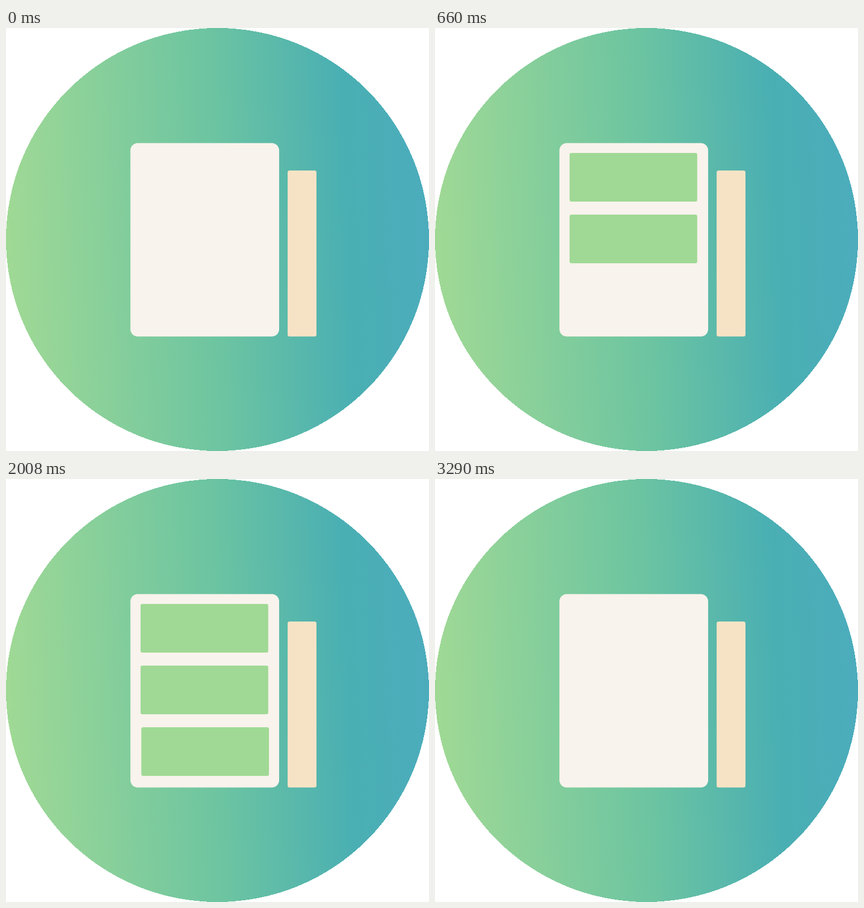
These frames come from a looping animation (748x748 px, 3.32 s). An HTML page:

```html
<!DOCTYPE html>
<html lang="en">
<head>
<meta charset="utf-8">
<title>Filling shelf</title>
<style>
  html, body { margin: 0; width: 100%; height: 100%; overflow: hidden; background: #fff; }
  svg { display: block; width: 100vw; height: 100vh; }
  .row { fill: #a0d995; opacity: 0; }
</style>
</head>
<body>
<svg viewBox="0 0 748 748">
  <defs>
    <linearGradient id="sky" gradientUnits="userSpaceOnUse" x1="0" y1="390" x2="748" y2="358">
      <stop offset="0" stop-color="#a0d995"/>
      <stop offset=".5" stop-color="#6cc4a1"/>
      <stop offset=".81" stop-color="#4aafb3"/>
      <stop offset="1" stop-color="#4cacbc"/>
    </linearGradient>
  </defs>
  <circle cx="374" cy="374" r="374" fill="url(#sky)" shape-rendering="crispEdges"/>
  <rect x="220" y="203.5" width="263" height="342" rx="13" fill="#f8f3ec"/>
  <rect x="498" y="252" width="51" height="293.5" rx="3.5" fill="#f6e3c5"/>
  <rect class="row" x="238" y="221" width="225.7" height="86" rx="3"/>
  <rect class="row" x="238" y="330" width="225.7" height="86" rx="3"/>
  <rect class="row" x="239.3" y="439" width="225.7" height="86" rx="3"/>
</svg>
<script>
  const LOOP = 3320;
  // [shown at, hidden at] in ms, top row first
  const spans = [[330, 2660], [660, 2990], [1030, 3290]];

  document.querySelectorAll('.row').forEach((row, i) => {
    const [on, off] = spans[i];
    const key = (ms, opacity) => ({ offset: ms / LOOP, opacity, easing: 'step-end' });
    const anim = row.animate([key(0, 0), key(on, 1), key(off, 0), key(LOOP, 0)],
      { duration: LOOP, iterations: Infinity });
    anim.startTime = document.timeline.currentTime;
  });
</script>
</body>
</html>
```
